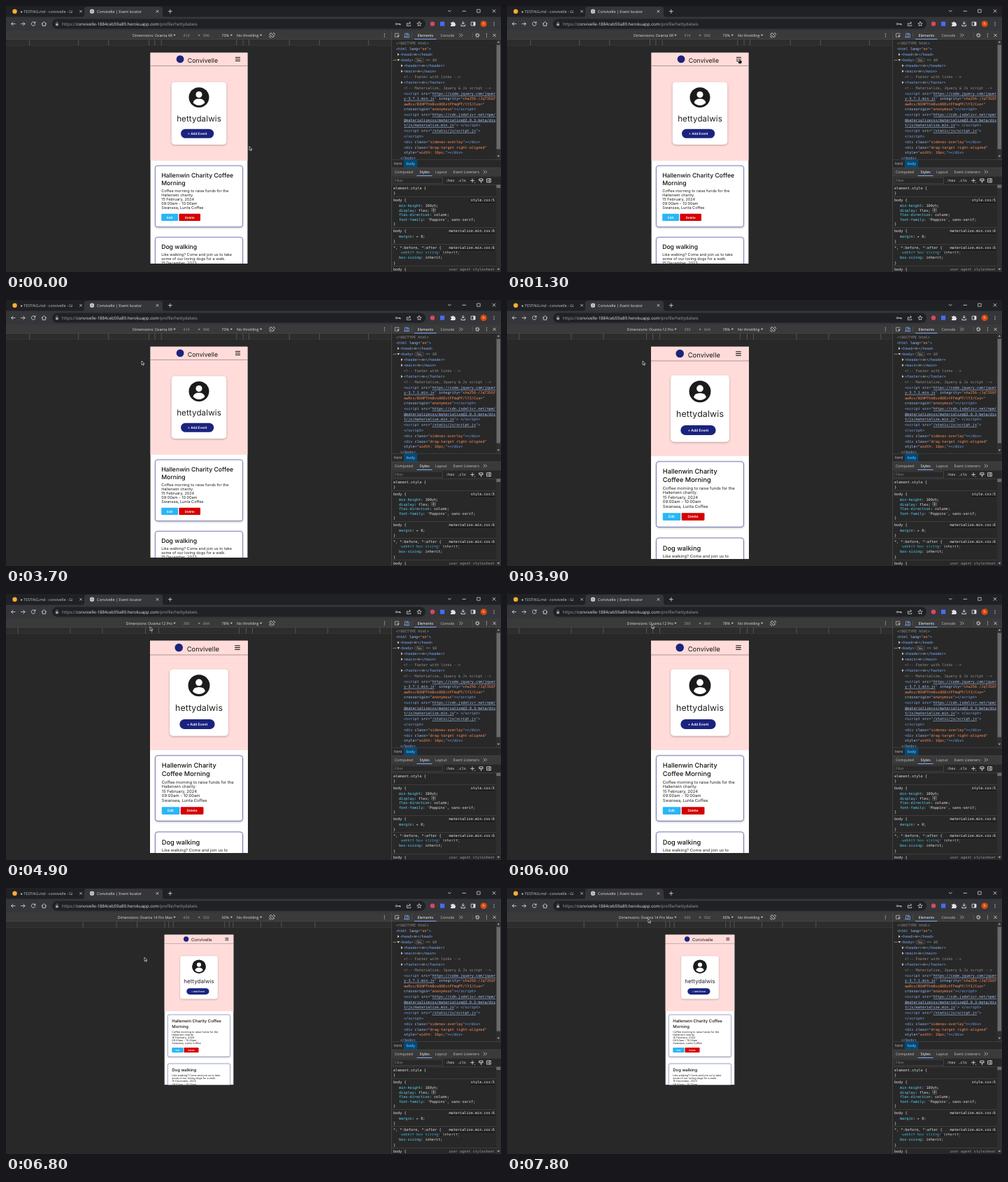
An HTML page for the animation above (8000 ms loop, 708x380 px).

```html
<!DOCTYPE html>
<html lang="en">
<head>
<meta charset="utf-8">
<title>Event locator</title>
<style>
html, body { margin: 0; width: 100%; height: 100%; overflow: hidden; background: #282828; }
#stage { display: block; width: 100vw; height: 100vh; }
text { white-space: pre; text-rendering: geometricPrecision; font-family: "Open Sans", "Noto Sans", sans-serif; }
.mono { font: 5.2px "DejaVu Sans Mono", "Noto Sans Mono", monospace; }
.page text { font-family: Inter, Roboto, sans-serif; }
.t { fill: #7cacf8; } .a { fill: #a8c7fa; } .v { fill: #fe8d59; }
.l { fill: #a8c7fa; text-decoration: underline; }
.c { fill: #959595; } .w { fill: #e3e3e3; } .k { fill: #5cd5fb; }
.card { filter: drop-shadow(0 3px 4px #0004); }
</style>
</head>
<body>
<svg id="stage" viewBox="0 0 708 380"></svg>
<script>
const LIGHT = '#e3e3e3', DIM = '#9aa0a6', STRIP = '#202124', BAR = '#3a3a3a', PANE = '#282828', INDIGO = '#1a237e';
const BLUE = '#7cacf8', TOP = 66.5, MID = 276;
const UNIT = 708 / 1536; // stage pixels per screen pixel

const rect = (x, y, w, h, fill, extra = '') =>
  `<rect x="${x}" y="${y}" width="${w}" height="${h}" fill="${fill}" ${extra}/>`;
const disc = (x, y, r, fill) => `<circle cx="${x}" cy="${y}" r="${r}" fill="${fill}"/>`;
const text = (x, y, s, size, fill, extra = '') =>
  `<text x="${x}" y="${y}" font-size="${size}" fill="${fill}" ${extra}>${s}</text>`;
const line = (d, color = LIGHT, w = .8) =>
  `<path d="${d}" fill="none" stroke="${color}" stroke-width="${w}" stroke-linecap="round" stroke-linejoin="round"/>`;
const shape = (d, fill) => `<path d="${d}" fill="${fill}"/>`;
const cross = (x, y, r, w) => line(`M${x - r} ${y - r}l${2 * r} ${2 * r}m0 ${-2 * r}l${-2 * r} ${2 * r}`, LIGHT, w);
const dots = (x, y) => [-2.2, 0, 2.2].map(d => disc(x, y + d, .6, LIGHT)).join('');
const down = (x, y) => shape(`M${x - 1.7} ${y - 1}h3.4l-1.7 2.3z`, '#c7c7c7');
const more = (x, y) => line(`M${x - 2.5} ${y - 2}l2 2l-2 2m2.7-4l2 2l-2 2`, '#c7c7c7', .7);

// Coloured code: segments split by "|", first letter is the class; [ ] stand for angle brackets
const code = (x, y, s, extra = '') =>
  `<text class="mono" x="${x}" y="${y + 1.8}" ${extra}>` + s.split('|').map(p =>
    `<tspan class="${p[0]}">${p.slice(1).replace(/\[/g, '&lt;').replace(/\]/g, '&gt;')}</tspan>`).join('') + '</text>';

function browser() {
  let s = rect(0, 0, 708, 16, STRIP) + shape('M108 16q4 0 4-4V5q0-4 4-4H220q4 0 4 4v7q0 4 4 4z', '#35363a') +
    rect(0, 15.5, 708, 19.5, '#35363a') + rect(66, 18.5, 534, 14, STRIP, 'rx="7"');
  s += disc(12.5, 7.7, 3.2, '#ffae33') + text(20.5, 9.8, '● TESTING.md - convivelle - Gi', 5.4, '#c4c7cb') +
    cross(107, 7.7, 1.5, .7) + disc(123, 7.7, 3.1, '#dfe1e5') +
    line('M120.2 7.7h5.6M123 4.9q-2.4 2.8 0 5.6q2.4-2.8 0-5.6', '#6b7075', .5) +
    text(130, 9.8, 'Convivelle | Event locator', 5.4, LIGHT) + cross(216.5, 7.7, 1.5, .8) +
    line('M232.3 7.7h5m-2.5-2.5v5');
  s += line('M632.3 6.2l2 2l2-2M653 7.3h4.6') + line('M674 5h4.2v4.2h-4.2z', LIGHT, .7) + cross(698, 7.2, 2, .8);
  s += line('M13 25.5h-5.4m2.4-2.4l-2.4 2.4l2.4 2.4M21.6 25.5h5.4m-2.4-2.4l2.4 2.4l-2.4 2.4') +
    line('M41.6 24a2.8 2.8 0 1 0 .2 2.4M41.9 22.6v1.8h-1.8') +
    line('M51 25.5l3.4-3l3.4 3m-5.6-.6v3.4h4.4v-3.4') +
    rect(71, 25, 3.8, 3.2, DIM, 'rx=".5"') + line('M71.8 25v-1.2a1.1 1.1 0 0 1 2.2 0V25', DIM, .6);
  s += `<text x="80" y="28" font-size="6.1" fill="${DIM}">https://<tspan fill="${LIGHT}">convivelle-1884ceb59a89.herokuapp.com</tspan>/profile/hettydalwis</text>`;
  s += line('M559.6 25.6a1.2 1.2 0 1 0 0 .1h4.6v1.3m-1.6-1.3v1') +
    line('M574.5 24.6h-1.2v3.8h5.4v-1.4m-3.8-.5q.4-2.4 3.2-2.4m-1.2-1.4l1.6 1.4l-1.6 1.5', LIGHT, .7) +
    line('M591 22.5l.9 2.1l2.3.2l-1.8 1.5l.6 2.2l-2-1.2l-2 1.2l.6-2.2l-1.8-1.5l2.3-.2z', LIGHT, .7) +
    disc(610, 25.5, 3.2, '#d9485f') + rect(621, 22.4, 6.2, 6.2, '#4a6cf0') +
    shape('M636 23.6h2a1.2 1.2 0 0 1 2.4 0h1.8v2a1.1 1.1 0 0 1 0 2.2v1.2h-6.2v-1.7a1.1 1.1 0 0 0 0-2.2z', LIGHT) +
    line('M653.8 22.3v3.6m-1.7-1.7l1.7 1.7l1.7-1.7M651 26.8v1.8h5.6v-1.8', LIGHT, .9) +
    line('M665.6 23h5.4v5h-5.4z') + rect(668.4, 23, 2.6, 5, LIGHT) +
    disc(683.2, 25.5, 4.6, '#d9480f') + text(683.2, 27.3, 'h', 5.2, '#fff', 'text-anchor="middle"') + dots(698, 25.5);
  return s;
}

function tree() {
  const rows = [
    [558, 'c[!DOCTYPE html]'],
    [558, 't[html|a lang|t="|ven|t"]'],
    [564, 't[head]', 't[/head]'],
    [564, 't[body]'],
    [569, 't[header]', 't[/header]'],
    [569, 't[main]', 't[/main]'],
    [569, 'c[!-- Footer with links --]'],
    [569, 't[footer]', 't[/footer]'],
    [569, 'c[!-- Materialize, Jquery &amp; Js script --]'],
    [569, 't[script|a src|t="|lhttps://code.jquery.com/jquer'],
    [569, 'ly-3.7.1.min.js|t"|a integrity|t="|vsha256-/JqT3SQf'],
    [569, 'vawRcv/BIHPThkBvs0OEvtFFmqPF/lYI/Cxo=|t"'],
    [569, 'acrossorigin|t="|vanonymous|t"][/script]'],
    [569, 't[script|a src|t="|lhttps://cdn.jsdelivr.net/npm/'],
    [569, 'l@materializecss/materialize@2.0.3-beta/dis'],
    [569, 'lt/js/materialize.min.js|t"] [/script]'],
    [569, 't[script|a src|t="|l/static/js/script.js|t"]'],
    [569, 't[/script]'],
    [569, 't[div|a class|t="|vsidenav-overlay|t"][/div]'],
    [569, 't[div|a class|t="|vdrag-target right-aligned|t"'],
    [569, 'astyle|t="|vwidth: 10px;|t"][/div]'],
    [564, 't[/body]']];
  let s = rect(552, 48, 156, 172, PANE), y = 45.2;
  for (const [x, open, close] of rows) {
    y += open[1] == '[' ? 8 : 7.4; // wrapped lines sit closer
    s += code(x, y, open);
    if (!close) continue;
    const end = x + (open.length - 1) * 3.13;
    s += rect(end + .3, y - 1.6, 4.8, 3.4, '#505050', 'rx="1"') +
      [1.3, 2.7, 4.1].map(d => disc(end + d, y + .1, .4, LIGHT)).join('') + code(end + 5.6, y, close) +
      shape(`M${x - 4} ${y - 2}v4l2.7-2z`, '#c7c7c7');
  }
  s += shape('M559.2 75.9h4l-2 2.8z', '#c7c7c7') + [554.3, 556, 557.7].map(x => disc(x, 77.2, .5, LIGHT)).join('') +
    rect(584.6, 74.6, 12.8, 5.4, 'none', 'rx="2.5" stroke="#757575" stroke-width=".5"') +
    text(591, 78.8, 'flex', 4.4, '#c7c7c7', 'text-anchor="middle"') +
    code(600.5, 77.2, 'c== $0', 'font-style="italic"');
  return s + rect(701, 48, 7, 172, '#2f2f2f') + rect(701.6, 55.5, 5.4, 149, '#6a6a6a') +
    shape('M702.4 52.5h4l-2-2.6zM702.4 213.5h4l-2 2.6z', DIM);
}

function styles() {
  let s = rect(552, 255, 156, 125, PANE);
  const rows = [
    [259.8, 'welement.style {'], [267.5, 'w}'],
    [277.5, 'wbody {', 'style.css:5'],
    [285, '  |kmin-height|w: 100vh;'], [291.8, '  |kdisplay|w: flex;'],
    [298.5, '  |kflex-direction|w: column;'], [305, "  |kfont-family|w: 'Poppins', sans-serif;"], [311.5, 'w}'],
    [321.2, 'wbody {', 'materialize.min.css:6'], [328.7, '  |kmargin|w: ▸ 0;'], [336, 'w}'],
    [345.2, 'w*, *:before, *:after {', 'materialize.min.css:6'],
    [352.6, '  |k-webkit-box-sizing|w: inherit;', '', 'text-decoration="line-through"'],
    [359.6, '  |kbox-sizing|w: inherit;'], [367, 'w}']];
  for (const [y, body, link, extra] of rows) {
    const inner = body.startsWith('  |');
    s += code(inner ? 562 : 554, y, inner ? body.slice(3) : body, extra);
    if (link) s += code(699, y, 'w' + link, 'text-anchor="end" text-decoration="underline"');
  }
  s += code(554, 376.2, 'wbody {', 'font-style="italic"') +
    code(699, 376.2, 'cuser agent stylesheet', 'font-style="italic" text-anchor="end"');
  s += [272, 316, 340.3, 371.2].map(y => rect(552, y, 149, .5, '#505050')).join('');
  s += rect(608.8, 288.8, 5.6, 5.4, 'none', 'stroke="#c7c7c7" stroke-width=".5" stroke-dasharray="1 .6"') +
    line('M611.6 289.4v4.2M609.6 291.5h4', '#c7c7c7', .6);
  return s + rect(701, 243, 7, 137, '#2f2f2f') + rect(701.4, 250.5, 5.8, 9.5, '#6a6a6a') +
    shape('M702.4 248.5h4l-2-2.6zM702.4 375h4l-2 2.6z', DIM);
}

function devtools() {
  let s = rect(0, 35, 708, 13, BAR) + rect(0, 47.6, 552, 9.2, '#2d2d2d') + rect(0, 47.5, 708, .5, '#505050') +
    rect(0, 56.5, 552, .5, '#3c3c3c');
  s += tree() + styles();
  s += rect(552, 219.5, 156, 11.5, PANE) + rect(552, 230.8, 156, 12, BAR) + rect(552, 242.8, 156, 12.4, PANE) +
    rect(569, 219.5, 19.2, 11.3, '#004a77') +
    text(555, 227, 'html', 5.3, '#c7c7c7') + text(572.5, 227, 'body', 5.3, '#a8c7fa') +
    [219.3, 230.8, 242.8, 255].map(y => rect(552, y, 156, .5, '#505050')).join('');
  s += [[556, 'Computed'], [591.5, 'Styles'], [614, 'Layout'], [639.5, 'Event Listeners']].map(([x, n]) =>
    text(x, 238.8, n, 5.3, n == 'Styles' ? '#fff' : '#c7c7c7')).join('') + more(685.5, 237) +
    rect(587.5, 242, 22, 1, BLUE);
  s += rect(553.8, 245, 70.5, 8.8, PANE, 'stroke="#5e5e5e" stroke-width=".5"') + text(556, 251.3, 'Filter', 5, '#8f8f8f') +
    code(629, 249.4, 'w:hov') + code(645.5, 249.4, 'w.cls') + line('M664.6 249.4h5m-2.5-2.5v5') + disc(670.5, 252.4, .5, LIGHT) +
    line('M677.2 247h4.8v2.6h-4.8zM679.6 249.8v2.6', LIGHT, .9) + line('M688 246.8h5.4v5h-5.4zM691.4 246.8v5m-1-2.5h-1.4', LIGHT, .8);
  // Panel toolbar
  s += line('M561 44.2h-4.6v-5h5.4v1.6', '#c7c7c7', .7) + shape('M559.3 41.2l4 1.5l-1.7.6l-.6 1.8z', '#c7c7c7') +
    line('M570.6 43.6v-4.4h4.6M569.4 44.5h3.4', BLUE, .8) + rect(573.5, 40.6, 2.8, 4.2, 'none', `stroke="${BLUE}" stroke-width=".8"`) +
    rect(580.5, 38, .5, 7.5, '#5e5e5e') + text(588.5, 43.8, 'Elements', 5.3, '#fff') + rect(584, 46.8, 31.5, 1, BLUE) +
    text(621.5, 43.8, 'Console', 5.3, '#c7c7c7') + more(651, 41.8) +
    `<circle cx="674.3" cy="41.8" r="2.4" fill="none" stroke="#c7c7c7" stroke-width="1.3" stroke-dasharray="1.2 .7"/>` +
    `<circle cx="674.3" cy="41.8" r="1.7" fill="none" stroke="#c7c7c7" stroke-width=".7"/>` +
    dots(687.5, 41.8) + cross(698.6, 41.8, 1.8, .8) + rect(667, 38, .5, 7.5, '#5e5e5e') + rect(551.3, 35, .7, 345, '#505050');
  // Device toolbar
  s += down(241, 41.7) + text(274.5, 44, '×', 6, '#c7c7c7') + down(322.3, 41.7) +
    text(330, 43.8, 'No throttling', 5.3, LIGHT) + down(364.6, 41.7) + dots(541.3, 41.8) +
    line('M379.2 38.6l4.4 4.4l-2 2l-4.4-4.4z', LIGHT, .9) + line('M382.4 38.4q2.2.4 2.4 2.4M376.6 43q.2 2 2.4 2.4', LIGHT, .8);
  return s;
}

function eventCard(w, y, title, body) {
  const mid = 'text-anchor="middle" font-weight="600"';
  const start = y + 78 + 33 * (title.length - 1);
  return rect(21, y, w - 42, 260, '#fff', 'class="card" rx="10" stroke="#3f46a0" stroke-width="2"') +
    title.map((s, i) => text(47, y + 49 + 33 * i, s, 25.7, '#111', 'font-weight="500"')).join('') +
    body.map((s, i) => text(47, start + 18.3 * i, s, 16.4, '#222')).join('') +
    rect(47, y + 204, 71, 30, '#29b6f6', 'rx="3"') + rect(122, y + 204, 91, 30, '#d50000', 'rx="3"') +
    text(82.5, y + 224, 'Edit', 13.5, '#fff', mid) + text(167.5, y + 224, 'Delete', 13.5, '#fff', mid);
}

function page({ w, h, pink, title, dogs }) {
  const c = w / 2, top = (56 + pink) / 2 - 132;
  const mid = 'text-anchor="middle"';
  return rect(0, 0, w, h, '#fff') + rect(0, 0, w, pink, '#ffdcd9') + rect(0, 56, w, 2, '#8d7676') +
    disc(c - 80, 28, 16, INDIGO) + text(c - 48, 42, 'Convivelle', 26.2, '#151515') +
    [20.5, 28, 35.5].map(y => rect(w - 52.5, y - 1.5, 21, 3, '#151515')).join('') +
    rect(c - 116.5, top, 233, 265, '#fff', 'class="card" rx="13"') + disc(c, top + 65, 43, '#1b1b1b') +
    disc(c, top + 53, 13.5, '#fff') + shape(`M${c - 25} ${top + 88}q3-17 25-17q22 0 25 17q-10 11-25 11q-15 0-25-11z`, '#fff') +
    text(c, top + 167, 'hettydalwis', 34.5, '#222', mid + ' letter-spacing=".3"') +
    rect(c - 77, top + 199, 140, 39, INDIGO, 'rx="19.5"') +
    text(c - 7, top + 223.5, '+ Add Event', 14, '#fff', mid + ' font-weight="600"') +
    eventCard(w, pink + 21.5, title, ['Coffee morning to raise funds for the', 'Hallenwin charity.',
      '15 February, 2024', '09:00am - 10:00am', 'Swansea, Lunta Coffee']) +
    eventCard(w, pink + 325, ['Dog walking'], dogs);
}

const wide = ['Hallenwin Charity Coffee', 'Morning'];
const wideDogs = ['Like walking? Come and join us to take', 'some of our loving dogs for a walk.', '15 December, 2023', '09:00am - 10:00am'];
const XR = { name: 'Ovanta XR', w: 414, h: 896, zoom: 73, pink: 459, title: wide, dogs: wideDogs };
const PRO = { name: 'Ovanta 12 Pro', w: 390, h: 844, zoom: 78, pink: 435.5,
  title: ['Hallenwin Charity', 'Coffee Morning'], dogs: ['Like walking? Come and join us to', 'take some of our loving dogs for a'] };
const MAX = { name: 'Ovanta 14 Pro Max', w: 430, h: 932, zoom: 50, pink: 475.5, title: wide, dogs: wideDogs };

// A device frame; the content may still be laid out for the previous device
function device(d, content = d) {
  const k = d.zoom / 100 * UNIT, inner = content.zoom / 100 * UNIT;
  const width = d.w * k, height = d.h * k;
  const ticks = [320, 375, 425, 768, 1024, 1440].flatMap(p => [-1, 1].map(side =>
    rect(MID + side * p * k / 2 - .4, 48, .8, 8.5, '#5e5e5e')));
  return `<g class="mode">` + ticks.join('') +
    text(238, 43.8, 'Dimensions: ' + d.name, 5.25, LIGHT, 'text-anchor="end"') +
    text(253.5, 43.8, d.w, 5.3, DIM) + text(282, 43.8, d.h, 5.3, DIM) + text(308.5, 43.8, d.zoom + '%', 5.3, LIGHT) +
    `<svg class="page" x="${MID - width / 2}" y="${TOP}" width="${width}" height="${height}" ` +
    `viewBox="0 0 ${width / inner} ${height / inner}">${page(content)}</svg></g>`;
}

const cursor = `<g id="cursor" stroke="#fff" stroke-width=".6" fill="#111" stroke-linejoin="round">
  <path id="arrow" d="M0 0V5.6L1.4 4.4L2.3 6.4L3.2 6L2.3 4.1H4Z"/>
  <path id="hand" d="M-.7 .6Q0-.5 .7 .6V2.8H2.2Q3.5 3 3.5 4V5.5Q3.3 7.6 2 7.7H-.6Q-1.9 6.6-2.7 4.8Q-2.2 3.7-.7 4.8Z"/></g>`;

const stage = document.getElementById('stage');
stage.innerHTML = rect(0, 0, 708, 380, PANE) + browser() + devtools() +
  device(XR) + device(PRO) + device(MAX, PRO) + device(MAX) + cursor;

const modes = [...stage.querySelectorAll('.mode')];
const starts = [0, 3800, 6600, 6700];
const moves = [[0, 348, 200.5], [500, 348, 200.5], [1200, 333, 75.5], [1400, 332, 74], [2300, 212, 44], [3699, 212, 44],
  [3700, 194, 87], [4400, 194, 87], [5000, 207, 43.5], [6599, 207, 43.5], [6600, 198, 99], [6900, 198, 99],
  [7500, 203.5, 45], [7600, 203.5, 45], [7800, 202, 44], [8000, 202, 44]];
const [pointer, arrow, hand] = ['cursor', 'arrow', 'hand'].map(id => document.getElementById(id));

function place(t) {
  const i = moves.findIndex((m, n) => n && t < m[0]);
  const [a, x, y] = moves[i - 1], [b, u, v] = moves[i];
  const p = (t - a) / (b - a), e = p * p * (3 - 2 * p);
  return [x + (u - x) * e, y + (v - y) * e];
}

function draw() {
  const now = performance.now() % 8000;
  const t = now - now % 100; // the screen is sampled ten times a second
  const active = starts.filter(s => s <= t).length - 1;
  modes.forEach((m, i) => m.style.display = i == active ? '' : 'none');
  pointer.setAttribute('transform', `translate(${place(t)})`);
  const over = t >= 1200 && t < 1500;
  hand.style.display = over ? '' : 'none';
  arrow.style.display = over ? 'none' : '';
  requestAnimationFrame(draw);
}
draw();
</script>
</body>
</html>
```
